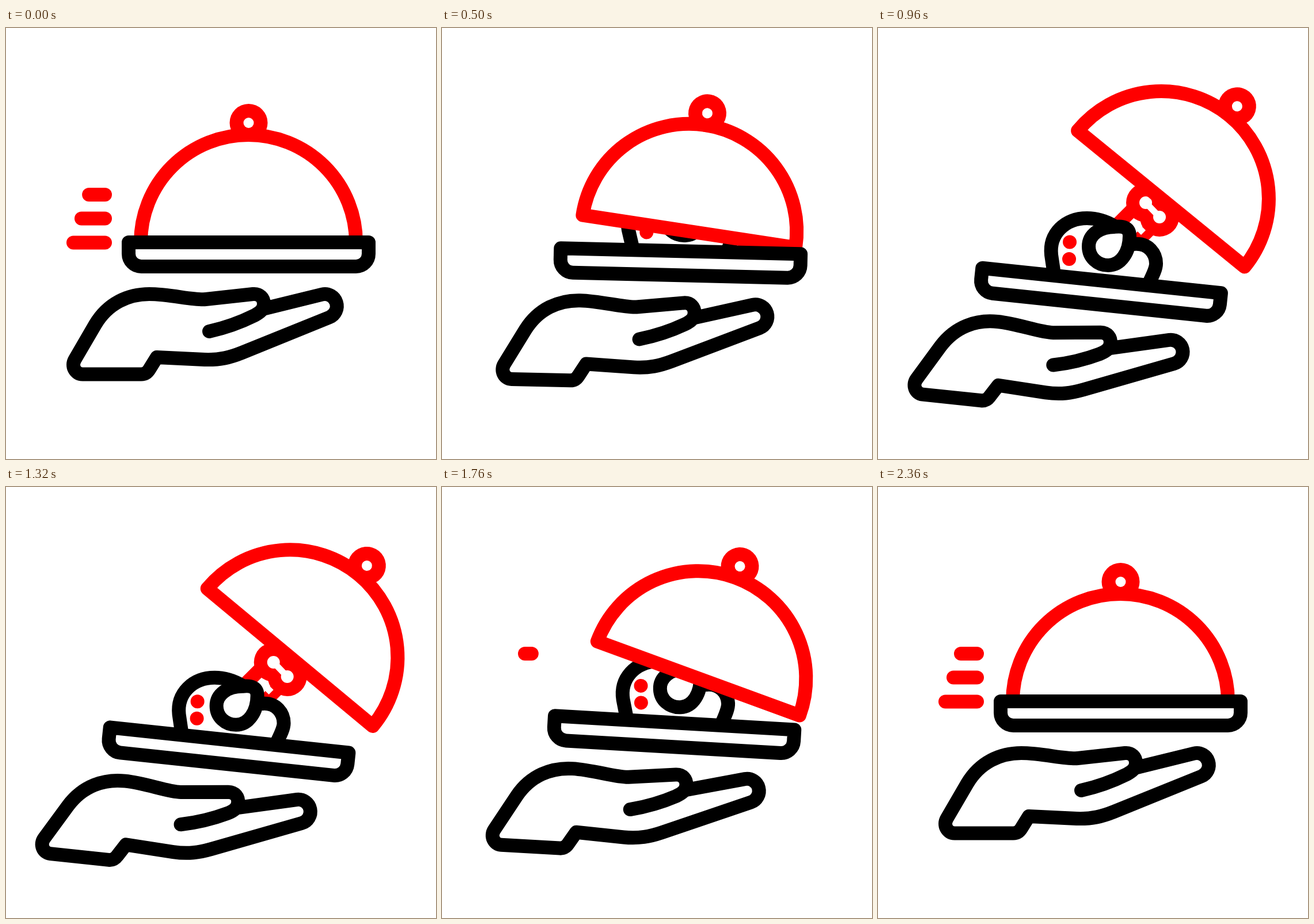
These frames come from a looping animation (747x750 px, 2.4 s). An HTML page with a canvas:

```html
<!DOCTYPE html>
<html lang="en">
<head>
<meta charset="utf-8">
<title>Serving dish</title>
<style>
  html, body { margin: 0; width: 100%; height: 100%; overflow: hidden; background: #fff; }
  canvas { display: block; }
</style>
</head>
<body>
<canvas id="stage" width="747" height="750"></canvas>
<script>
const ctx = document.getElementById('stage').getContext('2d');
const RED = '#f00', BLACK = '#000', WHITE = '#fff';
const LOOP = 2400, HALF = 1180, LINE = 24;
const MAX_TILT = 6.13;
const SERVED = 0.979; // tilt at which the food shapes are laid out

const HAND = new Path2D(`M353 528 C380 522 408 512 432 500 C441 495 448 490 448 480
  C448 470 441 462 429 463 L347 472 C325 474 285 463 249 463
  C212 463 177 479 155 516 L119.500 577 C113 588 120 602.500 133 602.500
  H235 Q244 602.500 249 594 L262 573 L345 577 C372 578 390 573 410 565
  L561.700 503.500 A21 21 0 0 0 549 463.600 L450 488`);
const TRAY = new Path2D('M213 373 H630 V393 a22 22 0 0 1 -22 22 H235 a22 22 0 0 1 -22 -22 Z');
const LID = new Path2D('M234 373 A187 187 0 0 1 608 373 Z');
const MEAT = new Path2D(`M306 429 L301 395 C297 358 325 331 363 331 C381 331 396 336 411 345
  M446 376 C470 374 483 393 483 410 C483 419 478 429 470 445`);
const MEAT_END = new Path2D(`M411 346 C427 344 437 348 437 362 C437 390 422 413 400 413
  C381 413 366 399 366 380 C366 360 385 346 411 346 Z`);
const SHAFT = new Path2D('M418 340 L445 313 M452 370 L479 343');
const SHAFT_GAP = new Path2D('M449 336 L465 352 L457 360 L441 344 Z');

const clamp = v => Math.min(1, Math.max(0, v));

// Symmetric cubic-bezier(a, 0, 1 - a, 1), solved by bisection.
function ease(x, a) {
  let lo = -0.5, hi = 0.5;
  for (let i = 0; i < 30; i++) {
    const u = (lo + hi) / 2;
    if (0.5 + 1.5 * (1 - a) * u + (6 * a - 2) * u ** 3 < x) lo = u; else hi = u;
  }
  return 0.5 + 1.5 * lo - 2 * lo ** 3;
}

function openness(t, a, closeTime) {
  return t < HALF ? ease(t / HALF, a) : 1 - ease(clamp((t - HALF) / closeTime), a);
}

function turn(x, y, degrees) {
  ctx.translate(x, y);
  ctx.rotate(degrees * Math.PI / 180);
  ctx.translate(-x, -y);
}

function tilt(amount, draw) {
  ctx.save();
  turn(-230, 92, MAX_TILT * amount);
  draw();
  ctx.restore();
}

function stroke(path, color, fill) {
  if (fill) {
    ctx.fillStyle = fill;
    ctx.fill(path);
  }
  ctx.strokeStyle = color;
  ctx.stroke(path);
}

function dot(x, y, r, color) {
  ctx.fillStyle = color;
  ctx.beginPath();
  ctx.arc(x, y, r, 0, 2 * Math.PI);
  ctx.fill();
}

function segment(x1, y1, x2, y2, color, width = LINE) {
  ctx.strokeStyle = color;
  ctx.lineWidth = width;
  ctx.beginPath();
  ctx.moveTo(x1, y1);
  ctx.lineTo(x2, y2);
  ctx.stroke();
  ctx.lineWidth = LINE;
}

function drawFood() {
  stroke(SHAFT, RED);
  dot(465, 304, 34, RED);
  dot(489, 329, 34, RED);
  dot(465, 304, 11, WHITE);
  dot(489, 329, 11, WHITE);
  segment(465, 304, 489, 329, WHITE, 11);
  ctx.fill(SHAFT_GAP);
  stroke(MEAT, BLACK);
  stroke(MEAT_END, BLACK, WHITE);
  dot(333, 372.5, 12, RED);
  dot(332, 402, 12, RED);
}

function drawLid(open) {
  ctx.save();
  ctx.translate(59 * open, -51 * open);
  turn(608, 373, 34 * open);
  stroke(LID, RED, WHITE);
  dot(421.5, 165, 33, RED);
  dot(421.5, 165, 9, WHITE);
  ctx.restore();
}

function drawSpeedLines(t) {
  [[144, 290], [131, 331.5], [117, 373.5]].forEach(([left, y], i) => {
    const length = 172 - left;
    const start = t < HALF ? clamp((t - 100 * i) / 200) : 0;
    const end = t < HALF ? 1 : clamp((t - 1660 - 150 * i) / 240);
    if (start < end) segment(left + length * start, y, left + length * end, y, RED);
  });
}

function frame(now) {
  const t = now % LOOP;
  const lean = openness(t, 0.82, HALF);
  const open = openness(t, 0.83, 1160);
  ctx.fillStyle = WHITE;
  ctx.fillRect(0, 0, 747, 750);
  ctx.lineWidth = LINE;
  ctx.lineCap = ctx.lineJoin = 'round';
  drawSpeedLines(t);
  tilt(lean - SERVED, drawFood);
  tilt(lean, () => {
    drawLid(open);
    stroke(TRAY, BLACK);
    stroke(HAND, BLACK);
  });
  requestAnimationFrame(() => frame(performance.now() - origin));
}

const origin = performance.now();
frame(0);
</script>
</body>
</html>
```
